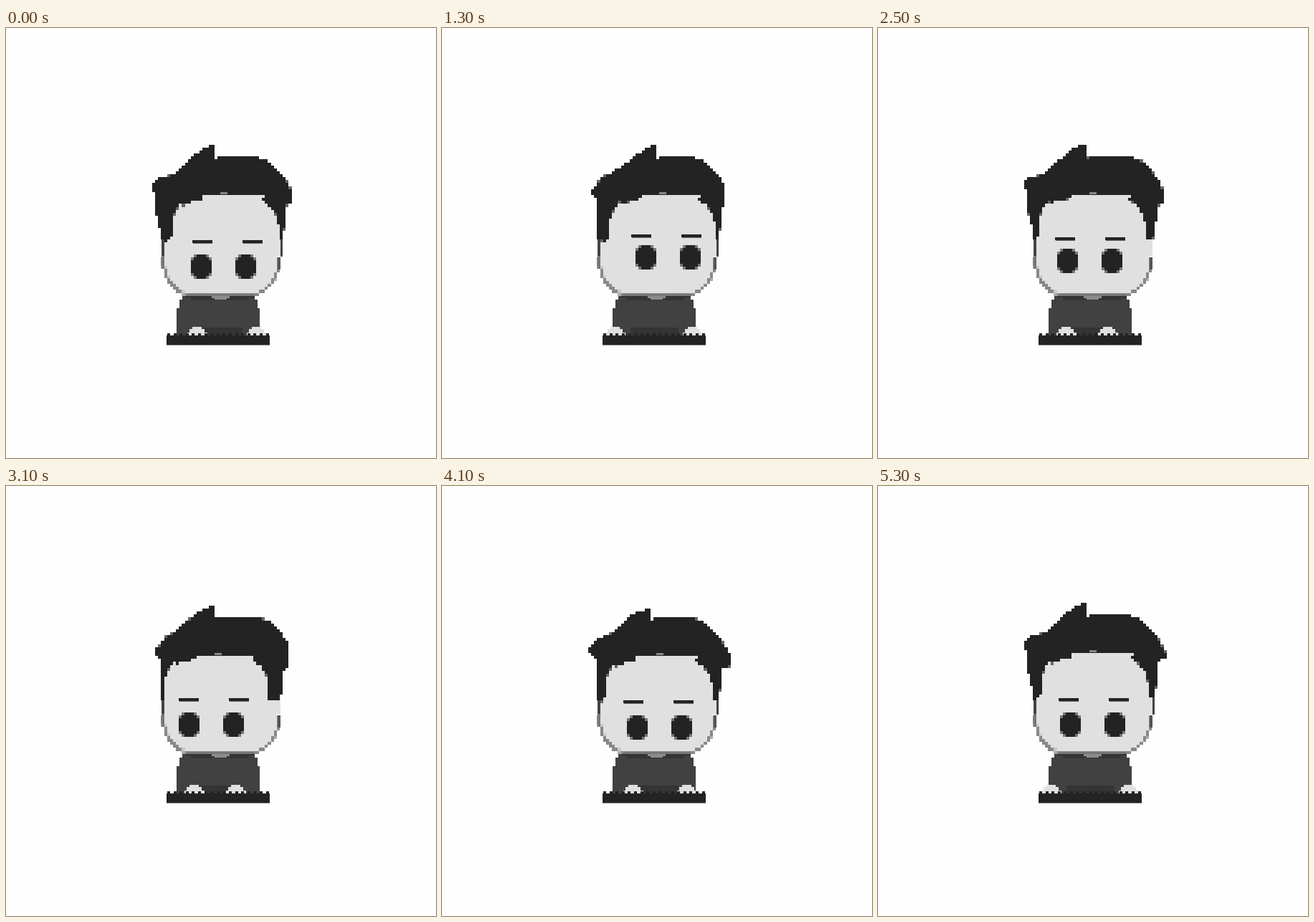
An HTML page with a canvas for the animation above (5500 ms loop, 600 px wide and 600 px high).

```html
<!DOCTYPE html>
<html lang="en">
<head>
<meta charset="utf-8">
<title>Typing character</title>
<style>
html, body { margin: 0; width: 100%; height: 100%; overflow: hidden; background: #fefefe; }
canvas { display: block; width: 600px; height: 600px; }
</style>
</head>
<body>
<canvas id="stage" width="600" height="600"></canvas>
<script>
const ctx = document.getElementById('stage').getContext('2d');
const LOOP = 5500, CELL = 4.138, OFFSET = 1.3, BLINK = 2100;
const DARK = '#232323', SKIN = '#e0e0e0';

// time, eye x, eye y, head turn, head nod, left hand, right hand
const KEYS = [
  [0,    258, 333, 0,    0,   267, 349],
  [1300, 271, 320, 2,    0,   240, 350],
  [2100, 254, 322, -5,   -4,  256, 325],
  [3100, 241, 333, -10,  2,   263, 321],
  [3500, 246, 341, -7.5, 4,   272, 343],
  [4500, 266, 337, -1,   4,   271, 333],
  [5300, 254, 333, -4,   0,   240, 350]
];
KEYS.push([LOOP, ...KEYS[0].slice(1)]);

const edgeOf = i => Math.round(OFFSET + i * CELL);
const cellOf = v => Math.floor((v - OFFSET) / CELL);
const snap = v => edgeOf(Math.round((v - OFFSET) / CELL));
const clamp = (v, lo, hi) => Math.min(hi, Math.max(lo, v));

function rect(color, x, y, w, h) {
  ctx.fillStyle = color;
  ctx.fillRect(x, y, w, h);
}

function polygon(points) {
  const path = new Path2D();
  points.forEach(([x, y]) => path.lineTo(x, y));
  path.closePath();
  return path;
}

// Fill a path cell by cell; barely covered cells take the edge colour.
function pixelate(path, color, edge, [x0, y0, x1, y1]) {
  for (let j = cellOf(y0); j <= cellOf(y1); j++) {
    for (let i = cellOf(x0); i <= cellOf(x1); i++) {
      let hits = 0;
      for (let k = 0; k < 9; k++) {
        const sx = OFFSET + (i + (k % 3 + 0.5) / 3) * CELL;
        const sy = OFFSET + (j + (Math.floor(k / 3) + 0.5) / 3) * CELL;
        if (ctx.isPointInPath(path, sx, sy)) hits++;
      }
      if (hits < 4) continue;
      const x = edgeOf(i), y = edgeOf(j);
      rect(hits > 4 ? color : edge, x, y, edgeOf(i + 1) - x, edgeOf(j + 1) - y);
    }
  }
}

// Head outline with curved jaw corners, mirrored about the middle.
function headPath(inset, top, brow) {
  const l = 217 + inset, r = 383 - inset, b = 374 - inset * 0.75;
  const path = new Path2D();
  path.moveTo(l, top);
  path.lineTo(l + brow, top - brow * 1.5);
  path.lineTo(r - brow, top - brow * 1.5);
  path.lineTo(r, top);
  path.lineTo(r, 322);
  path.quadraticCurveTo(r - 4, b - 3, r - 43, b);
  path.lineTo(l + 43, b);
  path.quadraticCurveTo(l + 4, b - 3, l, 322);
  path.closePath();
  return path;
}
const jaw = headPath(0, 320, 0), face = headPath(4, 262, 24);

// The corners and sideburns slide as the head turns and nods.
function hairPath({ eyeX, turn, nod, hairline }) {
  const spread = clamp((Math.abs(turn + 3.5) - 1.5) / 4, 0, 1);
  const far = Math.max(0, 2 * spread - 1), down = Math.max(0, nod);
  const away = Math.min(0, turn + 5);
  const tipX = 291 + 0.6 * Math.max(0, eyeX - 258), tipY = 164 + nod * 2.1;
  const leftX = 205 + 5 * far, leftY = 217 + 1.8 * nod + 6 * far;
  const outL = Math.min(216, 210 + 6 * far + 1.2 * down), lowL = Math.min(217, outL + 4);
  const inL = 233 + 1.1 * turn, endL = 299 + nod;
  const rightX = 403 - 9 * spread, topR = 236 - 16 * spread, lowR = 241 + 8 * spread + 2.5 * down;
  const outR = 387 + 0.6 * away, inR = 380 + 0.8 * turn + away, endR = 296 + 1.3 * nod;

  const back = [[leftX, leftY], [leftX + 8, leftY - 7], [222, 208 + nod], [235, 203 + nod]];
  const spike = [[tipX - 41, 188 + nod], [tipX - 23, 174 + nod], [tipX - 11, tipY + 2],
    [tipX - 9, tipY], [tipX, tipY], [tipX, 184 + nod], [tipX + 9, 180 + nod]];
  const dome = [[350, 180 + nod], [366, 186 + nod], [378, 196 + nod], [391, 213 + nod]];
  const right = [[rightX, topR], [rightX, lowR], [outR + 4, lowR + 3], [outR + 3, 268 + nod],
    [outR, endR - 8], [outR - 1, endR], [inR, endR], [inR, 275 + nod], [inR - 4, 260 + nod],
    [inR - 12, 248 + nod], [inR - 25, 240 + nod]];
  const fringe = [[inR - 17, hairline], [276 + turn, hairline], [274 + turn, 240 + nod],
    [254 + turn, 244 + nod], [247 + turn, 249 + nod]];
  const left = [[inL + 13, 240 + nod], [inL + 6, 251 + nod], [inL, 264 + nod], [inL - 1, endL - 8],
    [Math.max(lowL + 4, inL - 8), endL], [lowL + 1, endL - 4], [lowL, 264 + nod],
    [outL, 262 + nod], [outL, leftY + 16], [leftX, leftY + 10]];
  return polygon([...back, ...spike, ...dome, ...right, ...fringe, ...left]);
}

function drawBody() {
  rect('#414141', 246, 374, 101, 56);
  rect('#414141', 242, 379, 109, 51);
  rect('#414141', 238, 391, 116, 39);
  rect('#323232', 250, 372, 97, 4);
  rect('#353535', 258, 376, 80, 4);
  rect('#8c8c8c', 287, 373, 25, 4);
  rect('#8c8c8c', 291, 376, 17, 3);
  rect('#343434', 263, 418, 67, 12);
}

function drawHead(p) {
  pixelate(jaw, '#888', '#aaa', [214, 316, 388, 378]);
  pixelate(face, SKIN, '#c8c8c8', [217, 220, 388, 374]);
  rect(SKIN, 375, 262, 8, 56);
  rect('#777', 253, 371, 94, 3);
  rect('#444', 217, 290, 4, 28);
  rect('#777', 217, 318, 4, 18);
  rect('#555', 379, 320, 4, 17);
  if (p.turn > -5) rect('#444', 383, 290, 3, 29);
  pixelate(hairPath(p), DARK, '#666', [200, 154, 408, 325]);
  rect('#888', snap(301 + p.turn), p.hairline - 4, 10, 3);
}

function drawBrows({ turn, eyeY }) {
  const x = Math.round(260 + 1.9 * turn), y = Math.round(296 + 0.6 * (eyeY - 333));
  for (const left of [x, x + 70]) {
    rect(DARK, left, y, 28, 4);
    rect('#666', left + 1, y + 4, 27, 1);
  }
}

function drawEyes({ eyeX, eyeY }, closed) {
  const x = snap(eyeX), y = snap(eyeY - 17);
  for (const left of [x, x + 62]) {
    if (closed) {
      rect('#777', left, 318, 29, 2);
      rect(DARK, left, 320, 29, 4);
      continue;
    }
    rect('#777', left + 4, y, 21, 34);
    rect('#777', left, y + 4, 29, 26);
    rect(DARK, left + 8, y, 13, 34);
    rect(DARK, left + 4, y + 4, 21, 26);
    rect(DARK, left, y + 8, 29, 18);
  }
}

function drawHand(center) {
  const x = snap(center);
  rect(SKIN, x - 6, 417, 13, 4);
  rect(SKIN, x - 10, 420, 21, 5);
  rect(SKIN, x - 13, 425, 28, 5);
}

function drawKeyboard() {
  rect(DARK, 224, 429, 144, 13.5);
  for (let x = 225; x < 365; x += 8.6) rect(DARK, Math.round(x), 426, 4, 4);
}

function poseAt(t) {
  const n = KEYS.findIndex(k => k[0] > t), a = KEYS[n - 1], b = KEYS[n];
  const u = (t - a[0]) / (b[0] - a[0]);
  const [, eyeX, eyeY, turn, nod, handL, handR] = a.map((v, i) => v + (b[i] - v) * u);
  const typing = 8 * Math.sin(u * Math.PI * 2);
  return {
    eyeX, eyeY, turn, nod, hairline: snap(233.5 + nod),
    hands: [clamp(handL + typing, 240, 272), clamp(handR - typing, 321, 350)]
  };
}

function draw(t) {
  const pose = poseAt(t);
  rect('#fefefe', 0, 0, 600, 600);
  drawBody();
  drawHead(pose);
  drawBrows(pose);
  drawEyes(pose, t === BLINK);
  pose.hands.forEach(drawHand);
  drawKeyboard();
}

// Poses are held, with a few quicker changes late in the loop.
function stepAt(t) {
  if (t < 100) return 0;
  const gap = t >= 4500 && t < 4900 ? 100 : 200;
  return 100 + Math.floor((t - 100) / gap) * gap;
}

const start = performance.now();
let shown = -1;
function tick() {
  const step = stepAt((performance.now() - start) % LOOP);
  if (step !== shown) draw(shown = step);
  requestAnimationFrame(tick);
}
tick();
</script>
</body>
</html>
```
